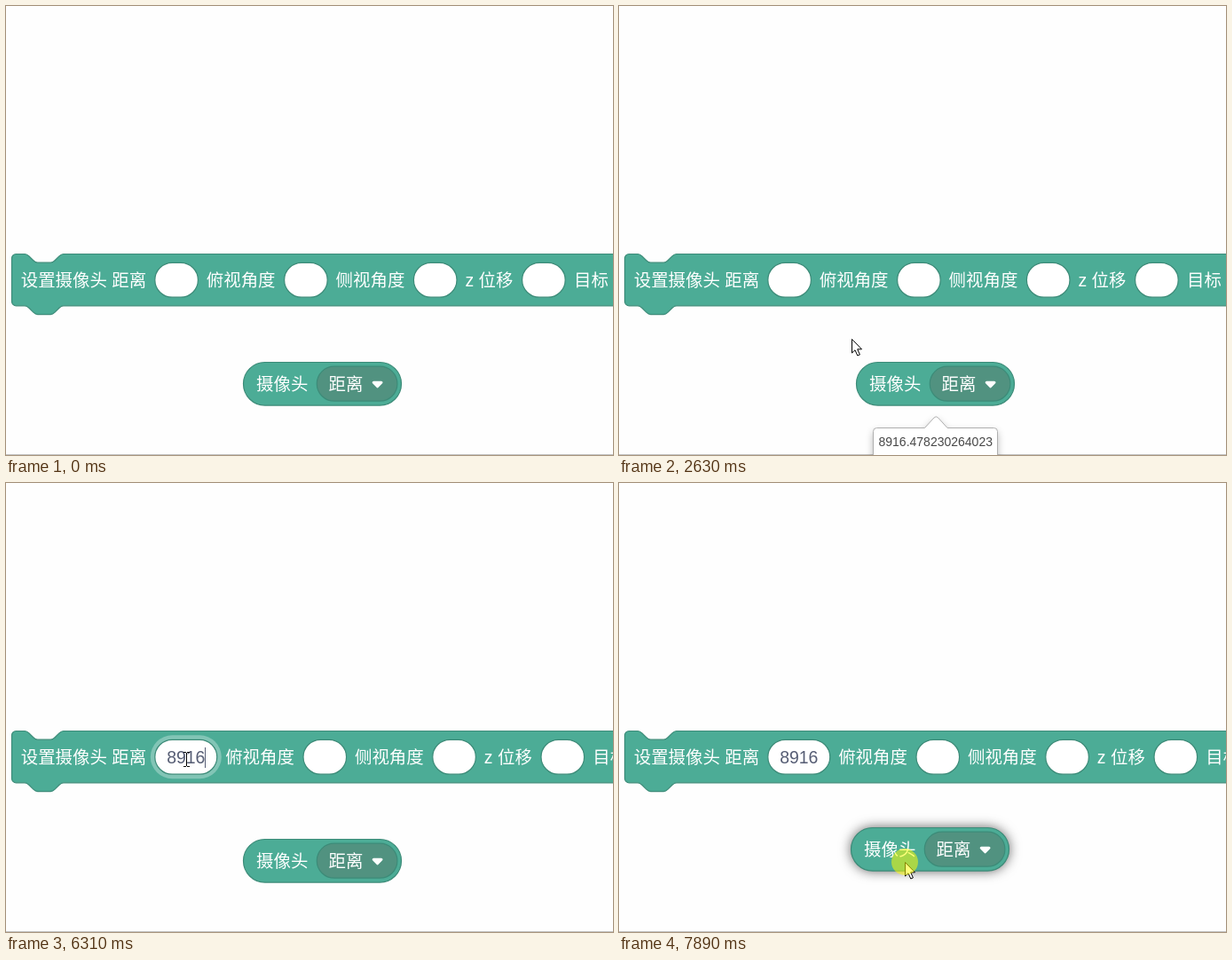
Write an HTML page with a canvas that moves like this. It is 684x506 px and loops after 8000 ms.

```html
<!DOCTYPE html>
<html lang="zh-CN">
<head>
<meta charset="utf-8">
<style>
  html, body { margin: 0; width: 100%; height: 100%; overflow: hidden; background: #fefefe; }
  canvas { display: block; }
</style>
</head>
<body>
<canvas id="stage" width="684" height="506"></canvas>
<script>
const ctx = document.getElementById('stage').getContext('2d');
const LOOP = 8000, S = 1.215, SIZE = 16 * S;
const FILL = '#4cac96', EDGE = '#3c8b78', MENU = '#519280', INK = '#575e75';
const FONT = '"Liberation Sans", "Noto Sans CJK SC", "Noto Sans CJK", sans-serif';

// Pointer moves: start, end, number of steps, then the points passed.
const MOVES = [
  [70, 280, 4, [594, 482], [478, 435], [358, 405], [293, 402]],
  [480, 1280, 10, [289, 408], [289, 410], [288, 420]],
  [1410, 1760, 6, [294, 417], [301, 424], [305, 428]],
  [2420, 3040, 9, [302, 424], [262, 375], [222, 329], [199, 310], [203, 311]],
  [6770, 7540, 12, [199, 307], [189, 300], [212, 355], [252, 435], [285, 477], [314, 456], [325, 432]],
  [7820, 7890, 2, [324, 430], [322, 427]]
];
const PRESSES = [[480, 690], [3240, 3380], [7610, LOOP]];
const TYPED = [[6310, '8916'], [6040, '891'], [4980, '89'], [4780, '8']];
const CARET_OFF = [[3920, 4450], [5510, 6040], [6840, 7370]];
const FOCUS = 3380, BLUR = 7610, DRAG = 7890;

const clamp = v => Math.max(0, Math.min(1, v));
const within = (t, spans) => spans.some(([a, b]) => t >= a && t < b);

function pointer(t) {
  const move = MOVES.filter(m => t >= m[0]).pop();
  if (!move) return null;
  const [start, end, steps, ...pts] = move;
  const gap = (end - start) / (steps - 1);
  const i = Math.min(steps - 1, Math.floor((t - start) / gap + 1e-6));
  const u = i / (steps - 1) * (pts.length - 1);
  const k = Math.min(pts.length - 2, Math.floor(u)), f = u - k;
  return [0, 1].map(n => pts[k][n] + (pts[k + 1][n] - pts[k][n]) * f);
}

function text(str, x, y, color = '#fff', size = SIZE) {
  ctx.font = `${size}px ${FONT}`;
  ctx.fillStyle = color;
  ctx.fillText(str, x, y);
}

function pill(x, y, w, h, fill, edge) {
  ctx.beginPath();
  ctx.roundRect(x, y, w, h, h / 2);
  ctx.fillStyle = fill;
  ctx.fill();
  if (edge) outline(edge, S);
}

function outline(color, width) {
  ctx.strokeStyle = color;
  ctx.lineWidth = width;
  ctx.stroke();
}

function stackBlock(typed, halo, caret) {
  ctx.save();
  ctx.translate(6.5, 279.5);
  ctx.scale(S, S);
  const shape = new Path2D('M0 4A4 4 0 0 1 4 0H12c2 0 3 1 4 2l4 4c1 1 2 2 4 2h12c2 0 3-1 4-2l4-4c1-1 2-2 4-2' +
    'H620V48H48c-2 0-3 1-4 2l-4 4c-1 1-2 2-4 2H24c-2 0-3-1-4-2l-4-4c-1-1-2-2-4-2H4A4 4 0 0 1 0 44Z');
  ctx.fillStyle = FILL;
  ctx.fill(shape);
  ctx.strokeStyle = EDGE;
  ctx.lineWidth = 1;
  ctx.stroke(shape);
  ctx.restore();

  const y = 289.3, h = 32 * S, base = 316.4;
  ctx.font = `${SIZE}px ${FONT}`;
  const typedW = ctx.measureText(typed).width;
  const firstW = Math.max(40 * S, typedW + 22 * S);
  const shift = firstW - 40 * S;

  text('设置摄像头 距离', 16.7, base);
  if (halo) pill(167.8 - halo, y - halo, firstW + 2 * halo, h + 2 * halo, 'rgba(255,255,255,.3)');
  pill(167.8, y, firstW, h, '#fff', EDGE);
  const left = 167.8 + (firstW - typedW) / 2;
  text(typed, left, 316, INK);
  if (caret) {
    ctx.fillStyle = INK;
    ctx.fillRect(Math.floor(left + typedW), 298, 1, 23);
  }

  [['俯视角度', 225.8, 313.6], ['侧视角度', 371.6, 459.4], ['z 位移', 517.5, 581.6], ['目标', 640]]
    .forEach(([label, x, slot]) => {
      text(label, x + shift, base);
      if (slot) pill(slot + shift, y, 40 * S, h, '#fff', EDGE);
    });
}

function reporter(dragged) {
  ctx.save();
  if (dragged) {
    ctx.translate(-6, -13);
    ctx.save();
    ctx.shadowColor = 'rgba(0,0,0,.65)';
    ctx.shadowBlur = 14;
    pill(267.5, 401.5, 178, 48.6, FILL);
    ctx.restore();
  }
  pill(267.5, 401.5, 178, 48.6, FILL, EDGE);
  text('摄像头', 282, 433.2);
  pill(350.3, 406.2, 90.6, 39, MENU, EDGE);
  text('距离', 363.6, 433.2);
  ctx.beginPath();
  ctx.moveTo(414.2, 424.3);
  ctx.lineTo(423, 424.3);
  ctx.lineTo(418.6, 428.8);
  ctx.closePath();
  ctx.fillStyle = '#fff';
  ctx.fill();
  ctx.lineJoin = 'round';
  outline('#fff', 3);
  ctx.restore();
}

function bubble(t) {
  const show = clamp((t - 690) / 250), hide = clamp((t - 3240) / 160);
  const alpha = show * (1 - hide);
  if (!alpha) return;
  ctx.save();
  ctx.globalAlpha = alpha;
  ctx.translate(0, -12 * (1 - show) * (1 - show));
  ctx.beginPath();
  ctx.moveTo(290.5, 475.5);
  ctx.lineTo(344.5, 475.5);
  ctx.lineTo(355, 464);
  ctx.quadraticCurveTo(357.3, 461.5, 359.6, 464);
  ctx.lineTo(370, 475.5);
  ctx.lineTo(422.5, 475.5);
  ctx.arcTo(426.5, 475.5, 426.5, 480, 4);
  ctx.lineTo(426.5, 530);
  ctx.lineTo(286.5, 530);
  ctx.lineTo(286.5, 479.5);
  ctx.arcTo(286.5, 475.5, 291, 475.5, 4);
  ctx.closePath();
  ctx.save();
  ctx.shadowColor = 'rgba(0,0,0,.3)';
  ctx.shadowBlur = 8;
  ctx.shadowOffsetY = 4;
  ctx.fillStyle = '#fff';
  ctx.fill();
  ctx.restore();
  outline('#b0b0b0', 1);
  text('8916.478230264023', 292.5, 496, '#484848', 14);
  ctx.restore();
}

function arrow() {
  ctx.beginPath();
  [[.5, .5], [.5, 16], [4, 12.8], [6.8, 19], [9.4, 17.9], [6.7, 11.8], [11.5, 11.8]]
    .forEach(p => ctx.lineTo(...p));
  ctx.closePath();
  ctx.fillStyle = '#fff';
  ctx.fill();
  outline('#000', 1);
}

function hand() {
  const fingers = [[-4.6, -5, -2.4, 2], [-1.4, -7, -.6, 1], [2.2, -6.6, 2, 1], [5.8, -4, 4.6, 3], [-6.6, 1.6, -2.6, 6]];
  ctx.lineCap = ctx.lineJoin = 'round';
  for (const [color, grow] of [['#000', 1], ['#fff', 0]]) {
    for (const [x1, y1, x2, y2] of fingers) {
      ctx.beginPath();
      ctx.moveTo(x1, y1);
      ctx.lineTo(x2, y2);
      outline(color, 2.2 + 2 * grow);
    }
    ctx.beginPath();
    ctx.moveTo(-2.6, 2);
    ctx.lineTo(4.8, 2);
    ctx.lineTo(3.6, 7.5);
    ctx.lineTo(-1.2, 7.5);
    ctx.closePath();
    ctx.fillStyle = color;
    ctx.fill();
    outline(color, 1 + 2 * grow);
  }
}

function beam() {
  ctx.fillStyle = '#000';
  ctx.fillRect(0, -7, 1, 15);
  for (const y of [-8, 8]) {
    ctx.fillRect(-3, y, 3, 1);
    ctx.fillRect(1, y, 3, 1);
  }
}

function cursor(t) {
  const p = pointer(t);
  if (!p) return;
  const [x, y] = p.map(Math.round);
  const pressed = within(t, PRESSES);
  const inSlot = x > 168 && x < 238 && y > 289 && y < 329;
  const onBlock = (y > 279 && y < 338) || (x > 268 && x < 445 && y > 401 && y < 450);
  ctx.save();
  ctx.translate(x, y);
  if (inSlot) beam();
  else if (onBlock && !pressed) hand();
  else arrow();
  if (pressed) {
    ctx.beginPath();
    ctx.arc(0, 0, 15, 0, 7);
    ctx.fillStyle = 'rgba(255,255,0,.52)';
    ctx.fill();
  }
  ctx.restore();
}

function draw(t) {
  const focused = t >= FOCUS && t < BLUR;
  const typed = (TYPED.find(([at]) => t >= at) || [0, ''])[1];
  const halo = focused ? 5 * clamp((t - FOCUS + 35) / 210) : 0;

  ctx.fillStyle = '#fefefe';
  ctx.fillRect(0, 0, 684, 506);
  ctx.fillStyle = '#c4c4c4';
  ctx.fillRect(0, 505, 684, 1);
  stackBlock(typed, halo, focused && !within(t, CARET_OFF));
  reporter(t >= DRAG);
  bubble(t);
  cursor(t);
}

const origin = performance.now();
function tick() {
  draw((performance.now() - origin) % LOOP);
  requestAnimationFrame(tick);
}
tick();
</script>
</body>
</html>
```
